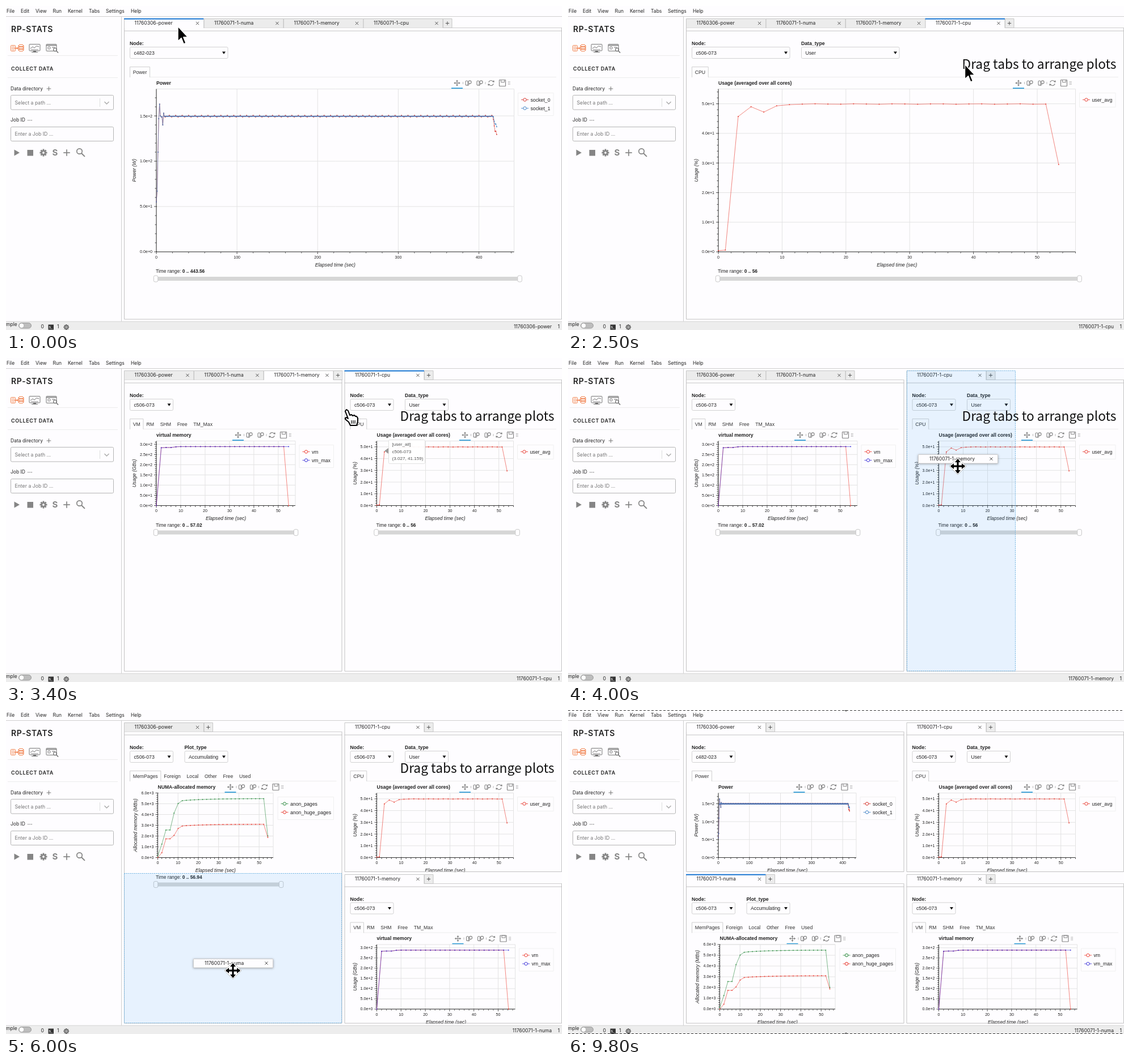
These frames come from a looping animation (980 px wide and 572 px high, 9.9 s). An HTML page with a canvas:

```html
<!DOCTYPE html>
<html lang="en">
<head>
<meta charset="utf-8">
<title>Arranging plot tabs</title>
<style>
html, body { margin: 0; width: 980px; height: 572px; overflow: hidden; background: #fff; }
canvas { display: block; width: 980px; height: 572px; }
</style>
</head>
<body>
<canvas id="stage" width="980" height="572"></canvas>
<script>
const ctx = document.getElementById('stage').getContext('2d');
const LOOP = 9900;
const UI = 'Inter, sans-serif';
const PLOT = '"Liberation Sans", Arial, sans-serif';
const BLUE = '#1976d2', GRAY = '#858585', INK = '#222', PAPER = '#fefdff';

// ---------- drawing helpers ----------
function text(str, x, y, { size = 8.7, font = PLOT, style = '', color = INK, align = 'left', spacing = 0 } = {}) {
  ctx.font = `${style} ${size}px ${font}`;
  ctx.letterSpacing = spacing + 'px';
  ctx.textAlign = align;
  ctx.textBaseline = 'alphabetic';
  ctx.fillStyle = color;
  ctx.fillText(str, x, y + size * 0.35);
  const width = ctx.measureText(str).width;
  ctx.letterSpacing = '0px';
  return width;
}
const ui = (str, x, y, opt = {}) => text(str, x, y, { size: 8.5, font: UI, ...opt });

function rect(x, y, w, h, color) {
  ctx.fillStyle = color;
  ctx.fillRect(x, y, w, h);
}
function path(points, color, width = 1, { fill } = {}) {
  ctx.beginPath();
  points.forEach(([x, y]) => ctx.lineTo(x, y));
  if (fill) { ctx.closePath(); ctx.fillStyle = fill; ctx.fill(); }
  if (color) { ctx.strokeStyle = color; ctx.lineWidth = width; ctx.stroke(); }
}
function line(x1, y1, x2, y2, color, width = 1) { path([[x1, y1], [x2, y2]], color, width); }
function box(x, y, w, h, color, fill, radius = 0, width = 1) {
  ctx.beginPath();
  ctx.roundRect(x, y, w, h, radius);
  if (fill) { ctx.fillStyle = fill; ctx.fill(); }
  if (color) { ctx.strokeStyle = color; ctx.lineWidth = width; ctx.stroke(); }
}
function ring(x, y, r, color, width = 1, fill) {
  ctx.beginPath();
  ctx.arc(x, y, r, 0, Math.PI * 2);
  if (fill) { ctx.fillStyle = fill; ctx.fill(); }
  ctx.strokeStyle = color; ctx.lineWidth = width; ctx.stroke();
}
function cross(x, y, r = 2.6) {
  line(x - r, y - r, x + r, y + r, '#444', 0.9);
  line(x - r, y + r, x + r, y - r, '#444', 0.9);
}
function plus(x, y, r, color = '#555', width = 1) {
  line(x - r, y, x + r, y, color, width);
  line(x, y - r, x, y + r, color, width);
}
function shifted(x, y, draw) {
  ctx.save(); ctx.translate(x, y); draw(); ctx.restore();
}

// ---------- data ----------
const series = (n, fn) => Array.from({ length: n }, (_, i) => fn(i));
const every2 = (head, settled, last) =>
  series(28, i => [i * 2.01, i === 27 ? last : i < head.length ? head[i] : settled(i)]);

const start = [55, 67, 110, 147, 163, 150, 149, 149, 140, 153];
const blip = i => i % 8 === 0 ? 1 : i % 8 === 3 ? -0.8 : 0;
const power = (tail, wobble) => series(423, i =>
  [i, i < 10 ? start[i] : i > 417 ? tail[i - 418] : 149.6 + wobble * blip(i)]);
const cpu = [[0, 0.4], ...series(27, i => [1.1 + 2.01 * i,
  [0.6, 45.7, 49, 47.2, 49.3, 49.7][i] ?? (i === 26 ? 29.5 : 49.92 + 0.08 * Math.sin(i * 2))])];
const vm = last => every2([0, 283, 284, 284, 287.5], () => 288.5, last);

const KINDS = {
  power: {
    name: '11760306-power', node: 'c482-023', tabs: ['Power'], title: 'Power', ylabel: 'Power (W)',
    xmax: 443.56, ymax: 179.7, xstep: 100, ystep: 50, left: 57, right: 84.5, tools: 185, legend: 78, slider: 10,
    lines: [['socket_0', '#d62f28', power([146, 139, 133, 133, 129.5], 1)],
            ['socket_1', '#3d7fc4', power([149, 144, 141, 141, 138], 0.1)]]
  },
  numa: {
    name: '11760071-1-numa', node: 'c506-073', extra: ['Plot_type', 'Accumulating'],
    tabs: ['MemPages', 'Foreign', 'Local', 'Other', 'Free', 'Used'],
    title: 'NUMA-allocated memory', ylabel: 'Allocated memory (MBs)',
    xmax: 56.94, ymax: 6000, xstep: 10, ystep: 1000, left: 59.5, right: 121.5, tools: 197, legend: 114, slider: 14,
    lines: [['anon_pages', '#2b8a3e', every2([150, 1250, 2560, 2560, 4130, 5020, 5280], i => 5480 - 190 * Math.exp(-(i - 6) / 6), 2000)],
            ['anon_huge_pages', '#e8372c', every2([0, 450, 1740, 1740, 2060, 2700, 2930], i => 3100 - 160 * Math.exp(-(i - 6) / 6), 1870)]]
  },
  memory: {
    name: '11760071-1-memory', node: 'c506-073', tabs: ['VM', 'RM', 'SHM', 'Free', 'TM_Max'],
    title: 'virtual memory', ylabel: 'Usage (GBs)',
    xmax: 57.02, ymax: 316, xstep: 10, ystep: 50, left: 57, right: 82.5, tools: 183.5, legend: 76, slider: 1,
    lines: [['vm', '#ef3b2f', vm(0)], ['vm_max', '#3a30d8', vm(288.5)]]
  },
  cpu: {
    name: '11760071-1-cpu', node: 'c506-073', extra: ['Data_type', 'User'], tabs: ['CPU'],
    title: 'Usage (averaged over all cores)', ylabel: 'Usage (%)',
    xmax: 56, ymax: 55, xstep: 10, ystep: 10, left: 57, right: 85.5, tools: 171, wideTools: 186, legend: 79, slider: 7,
    lines: [['user_avg', '#e8372c', cpu]]
  }
};

// ---------- plot panes ----------
const sci = v => {
  const e = v ? Math.floor(Math.log10(v) + 1e-9) : 0;
  return (v / 10 ** e).toFixed(1) + 'e+' + e;
};

function dropdown(label, value, x, y, w) {
  text(label, x, y, { style: 'bold' });
  box(x + 0.5, y + 6.5, w - 1, 20, '#d2d2d2', PAPER, 2);
  text(value, x + 7.5, y + 16.5);
  const cx = x + w - 7.5, cy = y + 14.5;
  path([[cx - 3, cy], [cx + 3, cy], [cx, cy + 4.5]], null, 1, { fill: '#111' });
}

function moveGlyph(x, y, r, color, width, head) {
  plus(x, y, r, color, width);
  for (const [dx, dy] of [[1, 0], [-1, 0], [0, 1], [0, -1]]) {
    const bx = x + dx * (r - head), by = y + dy * (r - head);
    path([[x + dx * (r + 1), y + dy * (r + 1)], [bx + dy * head, by + dx * head], [bx - dy * head, by - dx * head]],
      null, 1, { fill: color });
  }
}

function toolbar(x, y) {
  moveGlyph(x, y, 4.8, GRAY, 1.1, 2);
  rect(x - 10, y + 8.3, 20, 1.8, '#2b9bd8');
  line(x + 10.5, y - 2, x + 10.5, y + 2, '#bbb');
  for (const d of [20, 40]) {
    box(x + d - 5, y - 4, 4, 8, GRAY, null, 2, 1.1);
    ring(x + d + 2.5, y - 1.5, 2.6, GRAY, 1.1);
    line(x + d + 1.6, y + 1, x + d - 1, y + 5, GRAY, 1.2);
  }
  line(x + 50, y - 2, x + 50, y + 2, '#bbb');
  for (const a of [0.3, Math.PI + 0.3]) {
    ctx.beginPath(); ctx.arc(x + 60, y, 4.4, a, a + 2.5);
    ctx.strokeStyle = GRAY; ctx.lineWidth = 1.2; ctx.stroke();
  }
  path([[x + 62, y - 2], [x + 66, y - 1.5], [x + 65, y - 5]], null, 1, { fill: GRAY });
  path([[x + 58, y + 2], [x + 54, y + 1.5], [x + 55, y + 5]], null, 1, { fill: GRAY });
  box(x + 74.5, y - 5.5, 11, 11, GRAY, null, 0.5, 1.2);
  box(x + 77.5, y - 5.5, 6, 4, GRAY, null, 0, 1);
  for (let i = 0; i < 6; i++) rect(x + 90 + (i % 2) * 2.2, y - 3 + (i >> 1) * 2.4, 1.2, 1.2, '#999');
}

function plot(k, x0, y0, x1, y1, labelX) {
  const px = v => x0 + v / k.xmax * (x1 - x0), py = v => y1 - v / k.ymax * (y1 - y0);
  box(x0, y0, x1 - x0, y1 - y0, '#e3e3e3');
  for (let v = 0; v <= k.xmax; v += k.xstep / 5) {
    const major = Math.abs(v / k.xstep - Math.round(v / k.xstep)) < 0.01, x = px(v);
    if (major) {
      line(x, y0, x, y1, '#e3e3e3');
      text(String(Math.round(v)), x, y1 + 9.5, { size: 7.1, align: 'center' });
    }
    line(x, y1 - (major ? 1 : 0), x, y1 + (major ? 4 : 2.5), INK, 0.8);
  }
  for (let i = 0; i * k.ystep / 5 <= k.ymax + 1e-6; i++) {
    const v = i * k.ystep / 5, y = py(v), major = i % 5 === 0;
    if (major) {
      line(x0, y, x1, y, '#e3e3e3');
      text(sci(v), x0 - 7, y, { size: 7.1, align: 'right' });
    }
    line(x0 - (major ? 4 : 2.5), y, x0 + (major ? 1 : 0), y, INK, 0.8);
  }
  line(x0, y0, x0, y1, INK, 0.9);
  line(x0, y1, x1, y1, INK, 0.9);
  for (const [, color, data] of k.lines) {
    ctx.globalAlpha = 0.6;
    path(data.map(([a, b]) => [px(a), py(b)]), color, 1);
    ctx.globalAlpha = 1;
    data.forEach(([a, b]) => rect(px(a) - 0.8, py(b) - 0.8, 1.6, 1.6, color));
  }
  text('Elapsed time (sec)', (x0 + x1) / 2, y1 + 22.5, { style: 'italic', size: 8.6, align: 'center' });
  shifted(labelX, (y0 + y1) / 2, () => {
    ctx.rotate(-Math.PI / 2);
    text(k.ylabel, 0, 0, { style: 'italic', size: 8.6, align: 'center' });
  });
}

function legend(k, x, y, right) {
  box(x + 0.5, y + 0.5, right - x - 1, 10 + 15 * k.lines.length, '#f0f0f0', PAPER);
  k.lines.forEach(([label, color], i) => {
    const cy = y + 12.5 + 15 * i;
    line(x + 6, cy, x + 19, cy, color, 0.8);
    ring(x + 12.5, cy, 2.7, color, 1, PAPER);
    text(label, x + 22.5, cy);
  });
}

function content(k, x, y, right, wide) {
  const dw = wide ? 173.5 : 77;
  dropdown('Node:', k.node, x + 10, y + 44, dw);
  if (k.extra) dropdown(...k.extra, x + 10 + dw + 19.5, y + 44, dw);
  line(x + 10, y + 103.5, right - 10, y + 103.5, '#ececec');
  let tx = x + 15.7;
  k.tabs.forEach((label, i) => {
    const w = text(label, tx, y + 94.5, { color: '#333' });
    if (!i) {
      path([[tx - 5.2, y + 104], [tx - 5.2, y + 85.5], [tx + w + 5.2, y + 85.5], [tx + w + 5.2, y + 104]], '#d0d0d0');
      rect(tx - 4.7, y + 103, w + 9.4, 1.4, PAPER);
    }
    tx += w + 10.7;
  });
  const x0 = x + k.left, x1 = right - k.right, y0 = y + 124.5, y1 = y + (wide ? 412 : 238.5);
  text(k.title, x0, y + 113.5, { style: 'bold', size: 8.6 });
  toolbar(right - (wide && k.wideTools || k.tools), y + 114);
  plot(k, x0, y0, x1, y1, x + (k.left > 58 ? 20 : 18));
  legend(k, right - k.legend, y + 131, right - 14.5);
  const ly = y1 + 34.5, sx = x + 56;
  const lw = text('Time range: ', sx, ly, { size: 8.4 });
  text('0 .. ' + k.xmax, sx + lw, ly, { style: 'bold', size: 8.4 });
  const sr = x1 + k.slider;
  box(sx, ly + 9.5, sr - sx, 7, null, '#d6d6d6', 2);
  for (const hx of [sx, sr]) box(hx - 3.7, ly + 7.5, 7.5, 11, '#c9c9c9', PAPER, 2.5);
}

// tabs: kinds in the tab bar; shown: kind in view; active: highlighted tab; focus: blue top edge
function pane({ x, y = 22, right = 980, bottom = 553.5, tabs, shown, active = shown, focus, wide }) {
  const top = Math.round(y);
  ctx.save();
  ctx.beginPath(); ctx.rect(x - 1, top - 1, right - x + 2, bottom - top + 1.5); ctx.clip();
  rect(x, top, right - x, bottom - top, PAPER);
  line(x, top + 16.5, right, top + 16.5, '#cfcfcf');
  line(x, top + 22, right, top + 22, '#c4c4c4');
  const w = tabs.length === 3 ? 123 : 140.5;
  tabs.forEach((id, i) => {
    const tx = x + i * w, on = id === active;
    rect(tx, top + 0.5, w, on ? 16.8 : 16, on ? PAPER : '#ececec');
    path([[tx + 0.5, top + 17], [tx + 0.5, top + 0.5], [tx + w, top + 0.5], [tx + w, top + 17]], '#c2c2c2', 0.9);
    if (on && focus) rect(tx, top - 0.3, w, 2, BLUE);
    ui(KINDS[id].name, tx + 18.5, top + 8.5);
    cross(tx + w - 11, top + 8.5);
  });
  const px = x + tabs.length * w;
  box(px + 0.5, top + 0.5, 15.5, 16, '#c2c2c2', '#ececec', 0, 0.9);
  plus(px + 8, top + 8.5, 3.2);
  content(KINDS[shown], x, y, right, wide);
  path([[x + 0.5, top + 17], [x + 0.5, bottom - 0.5], [right - 0.5, bottom - 0.5], [right - 0.5, top + 17]], '#c2c2c2');
  ctx.restore();
}

// ---------- surrounding window ----------
function gear(x, y, r, color) {
  for (let i = 0; i < 4; i++) shifted(x, y, () => {
    ctx.rotate(i * Math.PI / 4);
    rect(-1.4, -r, 2.8, 2 * r, color);
  });
  ring(x, y, r * 0.5, color, r * 0.42, PAPER);
}
function magnifier(x, y, r, color, width) {
  ring(x, y, r, color, width);
  line(x + r * 0.7, y + r * 0.7, x + r * 2, y + r * 2, color, width + 0.3);
}

function sidebar() {
  ui('RP-STATS', 9, 41.5, { size: 14, style: '600', spacing: 0.7 });
  const o = '#f0753c';
  box(8.5, 69.5, 8, 10, o, null, 1, 0.9);
  for (const y of [72, 74.5, 77]) line(10, y, 15, y, o, 0.8);
  line(15, 74.5, 20, 74.5, o, 1.2);
  path([[19, 72.5], [21.5, 74.5], [19, 76.5]], null, 1, { fill: o });
  for (const y of [70, 74, 78]) {
    ctx.beginPath(); ctx.ellipse(26.5, y, 4.5, 1.8, 0, 0, 7);
    ctx.strokeStyle = o; ctx.lineWidth = 1; ctx.stroke();
  }
  line(22, 70, 22, 78, o); line(31, 70, 31, 78, o);
  box(41, 67.5, 19, 11.5, '#757575', null, 1);
  path([[43, 75], [47, 72], [50, 74], [54, 70.5], [58, 72]], '#757575');
  line(44, 77, 57, 77, '#757575', 0.8);
  rect(48, 79, 5, 2.5, '#757575'); rect(45, 81, 11, 1, '#757575');
  box(71, 67.5, 18, 12, '#757575', null, 1);
  line(71, 69.5, 89, 69.5, '#757575', 1.5);
  ring(76, 74, 2.2, '#757575'); line(81, 73, 86, 73, '#757575');
  magnifier(86.5, 77, 2.8, '#757575', 1.2);
  line(3, 87.5, 197, 87.5, '#ececec');
  ui('COLLECT DATA', 9, 110.5, { size: 9, style: '600', spacing: 0.6 });
  line(3, 126.5, 197, 126.5, '#ececec');
  ui('Data directory', 8, 146);
  plus(75.5, 146, 3.8, '#777');
  box(8.5, 157.5, 181, 25.5, '#b5b5b5', PAPER, 2);
  ui('Select a path ...', 15.5, 170.5, { size: 8.7, color: '#757575' });
  line(165.5, 163, 165.5, 178, '#ddd');
  path([[173.5, 169], [177.5, 173], [181.5, 169]], '#aaa', 1.4);
  ui('Job ID', 8, 201.5);
  for (const x of [39, 42, 45]) rect(x - 0.6, 201, 1.4, 1.4, '#777');
  box(8.5, 213.5, 181, 25, '#b5b5b5', PAPER, 2);
  ui('Enter a Job ID ...', 15.5, 226, { size: 8.7, color: '#757575' });
  path([[14.5, 253.5], [24, 259], [14.5, 264.5]], null, 1, { fill: GRAY });
  rect(37.5, 254, 10.5, 10.5, GRAY);
  gear(66, 259, 6.5, GRAY);
  ui('S', 86.5, 259, { size: 15, style: '700', color: GRAY, align: 'center' });
  plus(107, 259, 5.8, GRAY, 1.7);
  magnifier(129.5, 256.5, 4.7, GRAY, 1.7);
}

function chrome(status) {
  rect(0, 0, 980, 572, PAPER);
  const menu = { File: 1, Edit: 26, View: 52, Run: 82.5, Kernel: 109, Tabs: 146, Settings: 176, Help: 220 };
  for (const [label, x] of Object.entries(menu)) ui(label, x, 9.3);
  line(0, 18.5, 980, 18.5, '#d0d0d0');
  line(203.5, 18.5, 203.5, 557, '#cfcfcf');
  sidebar();
  rect(0, 557, 980, 15, '#ededed');
  line(0, 557, 980, 557, '#d4d4d4');
  ui('mple', 0, 562.5);
  box(22.5, 559.5, 22, 9.5, '#999', '#bdbdbd', 5);
  ring(27.5, 564.2, 4.3, '#999', 0.7, '#fff');
  ui('0', 61.5, 565.8);
  rect(74.5, 562.5, 9.5, 9, '#333');
  text('$_', 75.5, 567, { size: 6, color: '#fff' });
  ui('1', 90, 565.8);
  ring(106.3, 567, 3.6, '#444', 1.2);
  box(104.7, 565.4, 3.2, 3.2, '#444');
  for (let a = 0; a < 8; a++) line(106.3 + 3.8 * Math.cos(a * 0.785), 567 + 3.8 * Math.sin(a * 0.785),
    106.3 + 5 * Math.cos(a * 0.785), 567 + 5 * Math.sin(a * 0.785), '#444');
  ui(KINDS[status].name, 962, 565.8, { align: 'right' });
  ui('1', 972.5, 565.8);
}

// ---------- timeline ----------
const ROUTE = [
  [0, 303, 36], [450, 410, 34], [750, 420, 36], [1100, 548, 34], [1350, 555, 36], [1700, 684, 34], [2250, 688, 36],
  [2500, 699.5, 103], [2900, 850, 300], [3080, 850, 300], [3250, 668, 166], [3400, 597, 91], [3620, 512, 32],
  [3720, 512, 34], [4000, 687, 191], [4350, 790, 470], [4500, 790, 470], [5050, 365, 24], [5200, 360, 22],
  [5450, 385, 34], [6000, 400, 460], [6350, 400, 470], [6800, 499, 360], [LOOP, 499, 360]
];
function pointer(t) {
  const i = ROUTE.findIndex(r => r[0] > t);
  const [t0, x0, y0] = ROUTE[i - 1], [t1, x1, y1] = ROUTE[i];
  const u = (t - t0) / (t1 - t0), e = u * u * (3 - 2 * u);
  return [x0 + (x1 - x0) * e, y0 + (y1 - y0) * e];
}

const DRAGS = [['cpu', 2600, 3080], ['memory', 3750, 4500], ['numa', 5550, 6350]];
const ALL = ['power', 'numa', 'memory', 'cpu'];

function layout(t, drag) {
  if (t < 3080) {
    const shown = t < 500 ? 'power' : t < 1150 ? 'numa' : t < 1750 ? 'memory' : 'cpu';
    const tabs = drag ? ALL.slice(0, 3) : ALL;
    return { status: shown, panes: [{ x: 208, tabs, shown, active: drag ? '' : shown, focus: true, wide: true }] };
  }
  if (t < 4500) {
    const picked = t >= 3680;
    return {
      status: picked ? 'memory' : 'cpu',
      panes: [
        { x: 208, right: 592.5, tabs: ALL.slice(0, drag ? 2 : 3), shown: 'memory', active: drag ? '' : 'memory', focus: picked },
        { x: 596.5, tabs: ['cpu'], shown: 'cpu', focus: !picked }]
    };
  }
  const picked = t >= 5400;
  const cpuPane = { x: 596.5, bottom: 286, tabs: ['cpu'], shown: 'cpu' };
  const memoryPane = { x: 596.5, y: 289.5, tabs: ['memory'], shown: 'memory', focus: !picked };
  if (t < 6350) return {
    status: picked ? 'numa' : 'memory',
    panes: [{ x: 208, right: 592.5, tabs: drag ? ['power'] : ['power', 'numa'], shown: 'numa', active: drag ? '' : 'numa', focus: picked },
      cpuPane, memoryPane]
  };
  return {
    status: 'numa',
    panes: [{ x: 208, right: 592.5, bottom: 286, tabs: ['power'], shown: 'power' }, cpuPane,
      { x: 208, y: 289.5, right: 592.5, tabs: ['numa'], shown: 'numa', focus: true }, memoryPane]
  };
}

function dropZone(id, x, y) {
  if (id === 'cpu') return x > 740 ? [594, 22, 386, 531] : null;
  if (y < 90) return null;
  if (id === 'memory') {
    if (x < 597) return [400, 22, 192, 531];
    return y > 330 ? [597, 288, 383, 265] : [597, 22, 192, 531];
  }
  return y > 280 ? [208, 288, 384, 265] : [208, 22, 192, 531];
}

function drawDrag(id, x, y) {
  const zone = dropZone(id, x, y);
  if (zone) {
    rect(...zone, 'rgba(33,150,243,0.1)');
    ctx.setLineDash([2, 1.5]);
    box(zone[0] + 0.5, zone[1] + 0.5, zone[2] - 1, zone[3] - 1, '#6fb3e0');
    ctx.setLineDash([]);
  }
  ctx.save();
  ctx.shadowColor = 'rgba(0,0,0,0.35)'; ctx.shadowBlur = 4; ctx.shadowOffsetY = 1;
  rect(x - 70, y - 21, 141, 16, PAPER);
  ctx.restore();
  box(x - 69.5, y - 20.5, 140, 15.5, '#c2c2c2', null, 0, 0.8);
  ui(KINDS[id].name, x - 50, y - 13);
  cross(x + 59, y - 13);
}

const ARROW = [[0, 0], [0, 26], [6, 20.5], [10.2, 31], [14, 29.4], [9.8, 19], [17.5, 19]];
const HAND = [[3, 0], [6, 2], [9, 10], [12, 9], [14, 11], [17, 10], [19, 12], [21, 12], [23, 15], [23, 21],
  [21, 28], [10, 28], [7, 22], [1, 17], [1, 15], [3, 14], [6, 16], [1, 3]];
function drawPointer(kind, x, y) {
  ctx.lineJoin = 'round';
  if (kind === 'move') {
    path([[x, y - 15], [x + 15, y], [x, y + 15], [x - 15, y]], '#aaa', 0.8, { fill: '#fff' });
    moveGlyph(x, y, 12, '#000', 3.2, 5);
  } else shifted(x, y, () => {
    if (kind === 'hand') {
      path(HAND, '#000', 2, { fill: '#fff' });
      for (const fx of [12, 15, 18]) line(fx, 19, fx, 25, '#000', 1.2);
    } else path(ARROW, '#fff', 1.5, { fill: '#000' });
  });
  ctx.lineJoin = 'miter';
}

function tooltip() {
  box(674.5, 144.5, 64, 42, '#e2e2e2', 'rgba(255,255,255,0.95)', 2);
  path([[667, 164], [674, 159], [674, 169]], null, 1, { fill: '#999' });
  ['[user_all]', 'c506-073', '(3.027, 41.159)'].forEach((s, i) =>
    text(s, 680.5, 152.5 + 12.3 * i, { size: 8.1, color: '#555' }));
}

function render(t) {
  const drag = DRAGS.find(([, a, b]) => t >= a && t < b);
  const { status, panes } = layout(t, drag);
  const [x, y] = pointer(t);
  const ending = t >= 9750;
  chrome(status);
  panes.forEach(pane);
  if (t >= 3230 && t < 3580) tooltip();
  if (drag) drawDrag(drag[0], x, y);
  if (t >= 2150 && !ending)
    text('Drag tabs to arrange plots', 694.5, 103.5, { size: 22.75, font: '"Noto Sans CJK SC", "Open Sans", sans-serif', color: '#111' });
  if (ending) {
    ctx.setLineDash([4, 3]);
    line(0, 0.5, 980, 0.5, '#333'); line(0, 571.5, 980, 571.5, '#333');
    ctx.setLineDash([]);
    for (const hy of [0, 572]) ring(490, hy, 2, '#555', 1, '#888');
  } else drawPointer(drag ? 'move' : t >= 3300 && t < 3520 ? 'hand' : 'arrow', x, y);
}

const begin = performance.now();
function tick() {
  render((performance.now() - begin) % LOOP);
  requestAnimationFrame(tick);
}
tick();
</script>
</body>
</html>
```
